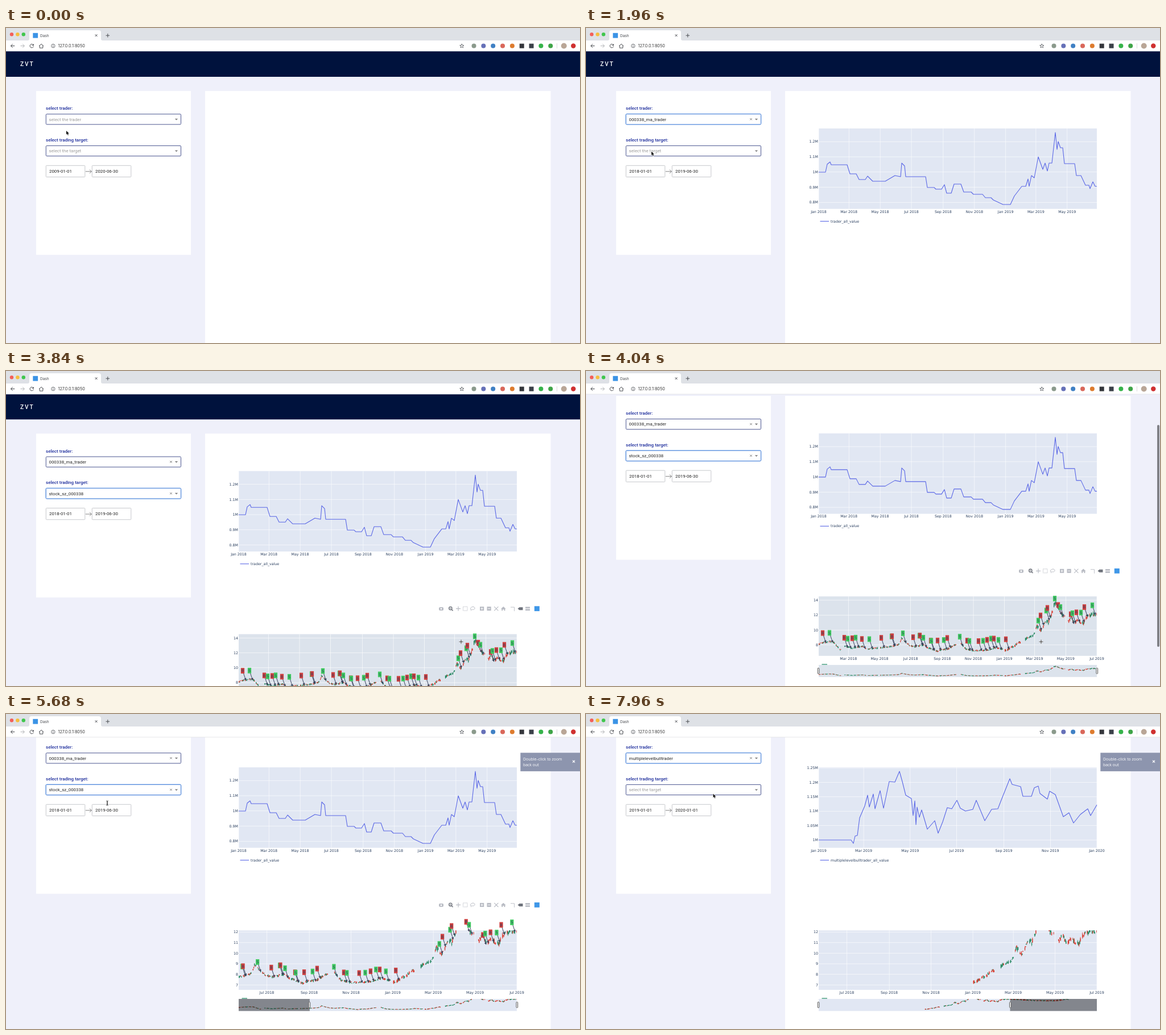
Animation, 1009 px wide and 555 px high, one loop 8000 ms. Source, as an HTML page with a canvas:

```html
<!DOCTYPE html>
<html>
<head>
<meta charset="utf-8">
<style>
html, body { margin: 0; height: 100%; overflow: hidden; background: #eff0fa; }
canvas { display: block; }
</style>
</head>
<body>
<canvas id="stage" width="1009" height="555"></canvas>
<script>
const c = document.getElementById('stage').getContext('2d');
const LOOP = 8000;
const SANS = 'Roboto, sans-serif', PLOT = '"DejaVu Sans", sans-serif', UI = 'Inter, sans-serif';
const INK = '#2a3f5f', NAVY = '#1c2c9c', PLOT_BG = '#e1e7f3', LINE = '#5a67e6';
const UP = '#23875f', DOWN = '#d93b30';
const LEFT = 409, WIDTH = 489;

// When things happen, in ms
const T = {
  open1: 480, pick1: 1480, data1: 1640, open2: 2440, pick2: 2880, data2: 3100,
  hover: 3500, scroll: 3825, scrollEnd: 4125, drag: 4960, zoom: 5300,
  leave: 5740, open3: 6200, pick3: 7040, data3: 7560
};

// time, x, y of the pointer
const POINTER = [
  [0, 106, 181], [440, 104, 160], [720, 104, 162], [1200, 115, 217.5], [2440, 115, 217.5],
  [2800, 115, 234], [3000, 115, 234], [3600, 800, 477], [4250, 800, 477], [4720, 738, 478],
  [4940, 896, 485], [5290, 533, 412], [5340, 533, 412], [5680, 178, 157], [5760, 178, 157],
  [6100, 100, 78], [6300, 100, 78], [6720, 93.5, 166], [7080, 93.5, 166], [7520, 223.5, 140.5]
];

const TRADERS = ['mysolotrader', 'volmacdtrader', '000338_ma_trader', 'bulltrader', 'multiplelevelbulltrader'];
const TARGETS = ['stock_sz_000338'];

const VALUE_A = new Path2D('M409 254H421L424 240 429 236 431 241H459L464 257H475L480 267H491L495 261 504 270H526L543 260 553 262 555 238 560 243 562 262H597L600 281H612L615 284H625L630 276 634 291H642L647 275H659L664 289H677L681 293H697L702 299H712L716 303 733 311H746L753 296 766 279H773L777 266 779 279 783 260 788 264 795 227 803 249 807 238 811 252 814 238H819L825 184 828 214 830 200 834 211H838L841 239H859L862 260H870L878 277H884L886 283 891 271 895 279H898');
const VALUE_B = new Path2D('M409 222H466L470 228 473 215 477 214 481 183 490 162 495 143 498 164 505 141 508 167 517 135 523 166 533 119 543 120 551 101 556 119 562 143 572 149 575 179 578 153 580 195 582 164 586 182 590 169 600 203 613 188 619 210 627 190 635 165 643 167 652 152 658 166 667 171 680 168 686 152 701 188 713 168 724 167 731 149 745 114 749 124 764 128 768 145H783L788 130 795 127 798 140 811 150 815 136 825 142 839 181 849 174 857 192 869 177 882 167 887 179 898 160');

// day since Jan 2018, price
const PRICE = [
  [0, 8.1], [22, 8.45], [30, 8.35], [43, 7.35], [50, 7.85], [66, 7.55], [87, 7.8], [94, 7.45],
  [113, 7.55], [149, 7.85], [159, 8.1], [163, 8.9], [179, 7.9], [191, 7.75], [206, 8], [214, 7.65],
  [234, 7.15], [243, 7.4], [253, 7.4], [267, 8], [280, 8.15], [290, 7.4], [309, 7.2], [332, 7.3],
  [348, 7.65], [368, 7.25], [382, 7.8], [407, 8.8], [421, 9.2], [429, 10.5], [437, 9.9],
  [446, 11.3], [451, 11], [456, 11.8], [463, 13.6], [468, 13.3], [478, 12], [483, 11.8], [490, 11.1],
  [496, 11.7], [502, 10.8], [508, 11.3], [520, 10.9], [526, 11.8], [537, 12.1], [546, 12.1],
  [600, 11.4], [640, 11.3], [671, 12.1]
];
const CLOSED = [[45, 51], [94, 97], [119, 121], [273, 279], [363, 365], [399, 405], [484, 488]];

const MONTHS = Array.from({ length: 13 }, (_, i) => (Date.UTC(2018, i * 2, 1) - Date.UTC(2018, 0, 1)) / 864e5);
const monthName = d => new Date(Date.UTC(2018, 0, 1 + d))
  .toLocaleDateString('en-US', { month: 'short', year: 'numeric', timeZone: 'UTC' });

const clamp = (v, a, b) => Math.max(a, Math.min(b, v));
const smooth = u => (u = clamp(u, 0, 1)) * u * (3 - 2 * u);
const rnd = n => { const v = Math.sin(n * 127.1 + 11.7) * 43758.5453; return v - Math.floor(v); };

function sample(keys, t, ease = u => u) {
  const i = keys.findIndex(k => k[0] > t);
  if (i < 0) return keys[keys.length - 1].slice(1);
  const a = keys[Math.max(i - 1, 0)], b = keys[i];
  const u = ease((t - a[0]) / (b[0] - a[0]));
  return a.slice(1).map((v, j) => v + (b[j + 1] - v) * u);
}

// Label positions in the unzoomed chart; buys and sells alternate
const TRADES = [
  416, 428, 454, 460, 468, 474, 485, 498, 519, 537, 538, 557, 575, 586, 587, 593, 606, 607, 618, 629,
  635, 657, 670, 674, 690, 698, 705, 712, 717, 725, 738, 795, 799, 809, 811, 824, 830, 834, 852, 855,
  862, 870, 876, 890
].map((x, i) => {
  const day = 0.8 + (x + 6 - LEFT) / WIDTH * 545.2;
  return { day, price: sample(PRICE, day)[0] * 0.99, sell: i % 2 };
});

const CANDLES = [];
for (let d = 1; d < 672; d++) {
  if (d % 7 > 4 || CLOSED.some(([a, b]) => d >= a && d <= b)) continue;
  const p = sample(PRICE, d)[0], size = p * (d < 365 ? 0.026 : 0.038);
  const open = p + (rnd(d) - 0.5) * size, close = p + (rnd(d + 0.37) - 0.5) * size;
  CANDLES.push({
    d, open, close,
    high: Math.max(open, close) + rnd(d + 0.6) * size * 0.4,
    low: Math.min(open, close) - rnd(d + 0.8) * size * 0.4
  });
}

function box(x, y, w, h, fill) { c.fillStyle = fill; c.fillRect(x, y, w, h); }
function dot(x, y, r, fill) { c.fillStyle = fill; c.beginPath(); c.arc(x, y, r, 0, 7); c.fill(); }
function ring(x, y, r, color, width) {
  c.beginPath(); c.arc(x, y, r, 0, 7);
  c.strokeStyle = color; c.lineWidth = width; c.stroke();
}
function stroke(d, color, width = 1) {
  c.strokeStyle = color; c.lineWidth = width;
  c.stroke(d instanceof Path2D ? d : new Path2D(d));
}
function shape(d, color) { c.fillStyle = color; c.fill(new Path2D(d)); }
function frame(x, y, w, h, color, r = 1.5, fill = '#fff') {
  c.beginPath(); c.roundRect(x, y, w, h, r);
  c.fillStyle = fill; c.fill();
  c.strokeStyle = color; c.lineWidth = 1; c.stroke();
}
// y is the optical middle of the capitals
function text(s, x, y, size, color, font = SANS, align = 'left', weight = 400) {
  c.font = `${weight} ${size}px ${font}`;
  c.textAlign = align; c.fillStyle = color;
  c.fillText(s, x, y + size * 0.36);
}
const tick = (s, x, y, align) => text(s, x, y, 6.31, INK, PLOT, align);
function clipTo(x, y, w, h, draw) {
  c.save(); c.beginPath(); c.rect(x, y, w, h); c.clip(); draw(); c.restore();
}
const cross = (x, y, r) => `M${x - r} ${y - r}l${2 * r} ${2 * r}m0 ${-2 * r}l${-2 * r} ${2 * r}`;
const plus = (x, y, r) => `M${x - r} ${y}h${2 * r}M${x} ${y - r}v${2 * r}`;

function select(y, label, hint, value, focus, open) {
  text(label, 70, y - 19.3, 8.05, NAVY, SANS, 'left', 500);
  if (focus && !open) frame(69.5, y - 9.8, 238.5, 19.6, '#b9d3f5', 2.5);
  frame(70.3, y - 9, 237.2, 18.2, open ? '#b4b9cc' : focus ? '#4a82d8' : '#4a5590');
  text(value || hint, 75.5, y, 7.88, value ? '#262626' : '#9a9a9a');
  if (open) box(76, y - 4.5, 0.7, 9, '#222');
  if (value) stroke(cross(290, y, 1.7), '#777', 0.9);
  const s = open ? -1 : 1;
  shape(`M296.8 ${y - s}h5.4l-2.7 ${2.8 * s}z`, '#808080');
}

function menu(y, items, py) {
  const row = 18.35;
  frame(70.3, y, 237.2, items.length * row + 1, '#c0c6d6', 1);
  const on = clamp(Math.floor((py - y) / row), 0, items.length - 1);
  box(70.8, y + 0.5 + on * row, 236.2, row, '#e4edfb');
  items.forEach((s, i) => text(s, 73, y + 9.6 + i * row, 7.88, NAVY));
}

function plotGrid(top, height, xs, ys, bg) {
  box(LEFT, top, WIDTH, height, bg);
  for (const [x, s] of xs) {
    box(x - 0.25, top, 0.6, height, '#fff');
    tick(s, x, top + height + 4.6, 'center');
  }
  for (const [y, s] of ys) {
    box(LEFT, y - 0.25, WIDTH, 0.6, '#fff');
    tick(s, 408, y, 'right');
  }
}
const months = (d0, d1) => MONTHS.filter(d => d >= d0 && d <= d1)
  .map(d => [LEFT + (d - d0) / (d1 - d0) * WIDTH, monthName(d)]);

function valueChart(second) {
  const ys = second
    ? ['1.25M', '1.2M', '1.15M', '1.1M', '1.05M', '1M'].map((s, i) => [178 + i * 25.4, s])
    : ['1.2M', '1.1M', '1M', '0.9M', '0.8M'].map((s, i) => [200.2 + i * 26.75, s]);
  plotGrid(177, 141.7, second ? months(365, 730) : months(0, 543), ys, PLOT_BG);
  c.lineJoin = 'round';
  c.save();
  if (second) c.translate(0, 83);
  stroke(second ? VALUE_B : VALUE_A, LINE, 1.1);
  c.restore();
  stroke('M411.5 340.5H427', LINE, 1.1);
  tick(second ? 'multiplelevelbulltrader_all_value' : 'trader_all_value', 430, 340.3);
}

function candles(list, X, Y, day) {
  const w = day * 0.5 + 0.8;
  for (const k of list) {
    const x = X(k.d), color = k.close > k.open ? UP : DOWN;
    const a = Y(Math.max(k.open, k.close)), b = Y(Math.min(k.open, k.close));
    box(x - 0.4, Y(k.high), 0.8, Y(k.low) - Y(k.high), color);
    box(x - w / 2, a - 0.4, w, b - a + 0.8, color);
  }
}

function trade(x, y, sell) {
  stroke(`M${x - 6} ${y - 17.5}L${x - 1} ${y - 2.5}`, '#465069', 1.05);
  shape(`M${x} ${y}l-3.6 -3.4 4 -1.4z`, '#3c455e');
  box(x - 9.1, y - 22.4, 6.2, 9.8, sell ? '#40cb60' : '#d0403f');
  tick(sell ? 'S' : 'B', x - 6, y - 17.5, 'center');
}

function priceChart(zoomed, second) {
  const d0 = zoomed ? 140 : 0.8, d1 = 546, p0 = 6.53, p1 = zoomed ? 12.17 : 14.53;
  const s0 = second ? 140 : 0.8, s1 = second ? 730 : 546;
  const X = d => LEFT + (d - d0) / (d1 - d0) * WIDTH;
  const Y = p => 569 - (p - p0) / (p1 - p0) * 105;
  const SX = d => LEFT + (d - s0) / (s1 - s0) * WIDTH;
  const SY = p => 606 - (p - p0) / (p1 - p0) * 21;
  const bg = zoomed ? PLOT_BG : '#dce3ec';
  const list = CANDLES.filter(k => second ? k.d >= 365 : k.d <= 546);
  const prices = zoomed ? [7, 8, 9, 10, 11, 12] : [8, 10, 12, 14];
  plotGrid(464.3, 104.7, months(d0, d1), prices.map(p => [Y(p), p]), bg);
  clipTo(LEFT, 464.3, WIDTH, 104.7, () => candles(list, X, Y, WIDTH / (d1 - d0)));
  if (!second) for (const k of TRADES)
    if (k.day >= d0 && k.price < p1) trade(X(k.day), Y(k.price), k.sell);

  box(LEFT, 585, WIDTH, 21.3, bg);
  clipTo(LEFT, 585, WIDTH, 21.3, () => candles(list, SX, SY, WIDTH / (s1 - s0)));
  const a = SX(d0), b = SX(d1);
  box(LEFT, 585, a - LEFT, 21.3, 'rgba(0,0,0,.42)');
  box(b, 585, LEFT + WIDTH - b, 21.3, 'rgba(0,0,0,.42)');
  for (const x of [a - 0.5, b + 0.3]) frame(x - 1.3, 590.6, 2.6, 9.8, '#555', 0.8);
  box(414.5, 583.3, 9.5, 1.4, '#3f9b7a');
}

function modebar() {
  const y = 419.4, g = '#b9bcc4', dark = '#6f737c';
  frame(761.5, y - 2, 7, 4.8, g, 1, g);
  dot(765, y + 0.4, 1.4, '#fff');
  ring(781.3, y - 0.6, 2.7, dark, 1.3);
  stroke(`M783.2 ${y + 1.4}l2.4 2.4`, dark, 1.5);
  stroke(plus(781.3, y - 0.6, 1.3), dark, 0.7);
  stroke(plus(795, y, 4), g, 1.2);
  c.setLineDash([1.4, 1]);
  stroke(`M803.5 ${y - 3.5}h7.5v7h-7.5z`, g, 1);
  c.setLineDash([]);
  stroke(`M817 ${y + 3.8}c2 -1 -1 -2 -.5 -4c1 -4 7.5 -4 7.5 -.7c0 3 -4 3 -6.5 2`, g, 1);
  box(833, y - 3.5, 7.2, 7, g); stroke(plus(836.6, y, 2), '#fff', 1);
  box(845.5, y - 3.5, 7.2, 7, g); stroke(`M847.1 ${y}h4`, '#fff', 1);
  stroke(cross(861.8, y, 3.6), g, 1.1);
  shape(`M870 ${y + 0.3}l4.3 -4 4.3 4h-1.2v3.3h-2v-2.3h-2.2v2.3h-2v-3.3z`, g);
  stroke(`M887 ${y - 2.6}h6.5v7`, g, 0.9);
  shape(`M899.5 ${y}l3 -2.5h6v5h-6z`, dark);
  box(913, y - 3.2, 8, 2.7, g); box(913, y + 0.7, 8, 2.7, g);
  box(928.8, y - 4.4, 9, 8.8, '#3f97e8');
}

function page(t, scroll, px, py) {
  box(0, 41, 1009, 700, '#eff0fa');
  box(0, 41, 1009, 45, '#00123d');
  c.letterSpacing = '1.9px';
  text('ZVT', 25, 63.6, 10.2, '#fff', SANS, 'left', 500);
  c.letterSpacing = '0px';
  box(53, 111, 272, 288.7, '#fff');
  box(350, 111, 607.5, 600, '#fff');

  const open1 = t >= T.open1 && t < T.pick1 || t >= T.open3 && t < T.pick3;
  const open2 = t >= T.open2 && t < T.pick2;
  const trader = t < T.pick1 ? '' : TRADERS[t < T.pick3 ? 2 : 4];
  const target = t >= T.pick2 && t < T.data3 ? TARGETS[0] : '';
  const focus1 = t >= T.open1 && t < T.open2 || t >= T.open3;
  select(160.7, 'select trader:', 'select the trader', trader, focus1, open1);
  select(216.4, 'select trading target:', 'select the target', target, t >= T.open2 && t < T.open3, open2);

  const dates = t < T.data1 ? ['2009-01-01', '2020-06-30']
    : t < T.data3 ? ['2018-01-01', '2019-06-30'] : ['2019-01-01', '2020-01-01'];
  dates.forEach((s, i) => {
    frame(70.3 + i * 81, 242.3, 68.5, 20.2, '#c6c8cc', 1);
    text(s, 76 + i * 81, 252.2, 7.9, '#222');
  });
  stroke('M139.8 252.8h10.5m-3.3 -3.3l3.3 3.3 -3.3 3.3', '#777', 0.9);

  if (t >= T.data1) valueChart(t >= T.data3);
  if (t >= T.data2) priceChart(t >= T.zoom, t >= T.data3);
  if (t >= T.hover && t < T.leave) modebar();
  if (t >= T.drag && t < T.zoom) {
    c.beginPath();
    c.rect(LEFT, 464.3, WIDTH, 104.7);
    c.rect(px, py + scroll, LEFT + WIDTH - px, 569 - py - scroll);
    c.fillStyle = 'rgba(0,0,0,.2)';
    c.fill('evenodd');
  }
  if (open1) menu(170, TRADERS, py + scroll);
  if (open2) menu(225.7, TARGETS, py + scroll);
}

function browser() {
  const ink = '#4a4d52';
  box(0, 0, 1009, 22, '#dee1e6');
  box(0, 22, 1009, 19, '#fff');
  box(0, 40.6, 1009, 0.6, '#d5d7da');
  ['#f3605a', '#f6be3c', '#3fc64d'].forEach((f, i) => dot(10 + i * 10.4, 11.3, 3.2, f));
  shape('M38 22q3 0 3 -3V8q0 -4 4 -4H163q4 0 4 4V19q0 3 3 3z', '#fff');
  box(47.3, 8.8, 8.8, 8.8, '#3b93e6');
  text('Dash', 60, 13.2, 6.5, '#45484d', UI);
  stroke(cross(158.6, 13.1, 1.9), ink, 1);
  stroke(plus(178.8, 13.2, 3.3), ink, 1);
  stroke('M15.3 31.5h-6.8m3.2 -3.3l-3.3 3.3 3.3 3.3', ink, 1);
  stroke('M25.5 31.5h6.8m-3.2 -3.3l3.3 3.3 -3.3 3.3', '#b4b6b9', 1);
  stroke('M47.8 29.6a3.2 3.2 0 1 0 .6 2.6', ink, 1);
  shape('M48.8 27.8v3.2h-3.2z', ink);
  stroke('M58 31.8l4 -3.7 4 3.7m-6.8 -.8v4.2h5.6v-4.2', ink, 1);
  ring(82.9, 31.5, 3.2, ink, 0.8);
  box(82.5, 31, 0.9, 2.3, ink); box(82.5, 29.5, 0.9, 0.9, ink);
  text('127.0.0.1:8050', 91.5, 31.5, 7.2, '#333', UI);
  let star = '';
  for (let i = 0; i < 10; i++) {
    const r = i % 2 ? 1.6 : 3.8, a = i * Math.PI / 5;
    star += `${i ? 'L' : 'M'}${801.3 + r * Math.sin(a)} ${31.7 - r * Math.cos(a)}`;
  }
  stroke(star + 'z', ink, 0.8);
  ['#8b9a8c', '#6670b8', '#3f80c4', '#d9675a', '#dd7b2e', '#33353a', '#3a4048', '#35b34a', '#3fa447']
    .forEach((f, i) => {
      const x = 822.5 + i * 16.84;
      if (i === 5 || i === 6) box(x - 4, 27.6, 8, 8, f);
      else dot(x, 31.5, 4, f);
    });
  box(968, 27, 0.7, 9, '#ccc');
  dot(980.7, 31.5, 5, '#b9a697');
  dot(997.3, 31.5, 4.2, '#cf3030');
}

function notice() {
  box(904.3, 68.3, 105, 32.6, '#8d95ae');
  text('Double–click to zoom', 909, 79.2, 6.9, '#fff', '"Open Sans", sans-serif');
  text('back out', 909, 90, 6.9, '#fff', '"Open Sans", sans-serif');
  stroke(cross(998, 83.6, 2), '#fff', 1.3);
}

function pointer(t, x, y) {
  if (t >= T.hover && t < T.zoom + 60) {
    stroke(plus(x, y, 3.5), '#fff', 1.8);
    stroke(plus(x, y, 3.5), '#222', 0.9);
  } else if (t >= T.zoom && t < T.pick3 + 100) {
    stroke(`M${x - 1.7} ${y - 4}q1.7 0 1.7 1.2v5.6q0 1.2 -1.7 1.2m3.4 -8q-1.7 0 -1.7 1.2v5.6q0 1.2 1.7 1.2`, '#222', 0.9);
  } else {
    const d = `M${x} ${y}v6.8l1.6 -1.5 1.1 2.6 1.2 -.5 -1.1 -2.5h2.2z`;
    stroke(d, '#fff', 1.2);
    shape(d, '#111');
  }
}

function draw(now) {
  const t = now % LOOP;
  const [px, py] = sample(POINTER, t, smooth);
  const scroll = 83 * smooth((t - T.scroll) / (T.scrollEnd - T.scroll));
  clipTo(0, 41, 1009, 514, () => {
    c.translate(0, -scroll);
    page(t, scroll, px, py);
  });
  browser();
  if (t >= T.scroll + 20 && t < 5000) {
    c.globalAlpha = clamp((5000 - t) / 200, 0, 1);
    c.beginPath(); c.roundRect(1004, 44 + scroll * 0.76, 4, 391, 2);
    c.fillStyle = '#7f8086'; c.fill();
    c.globalAlpha = 1;
  }
  if (t >= T.zoom) notice();
  pointer(t, px, py);
  requestAnimationFrame(draw);
}
requestAnimationFrame(draw);
</script>
</body>
</html>
```
